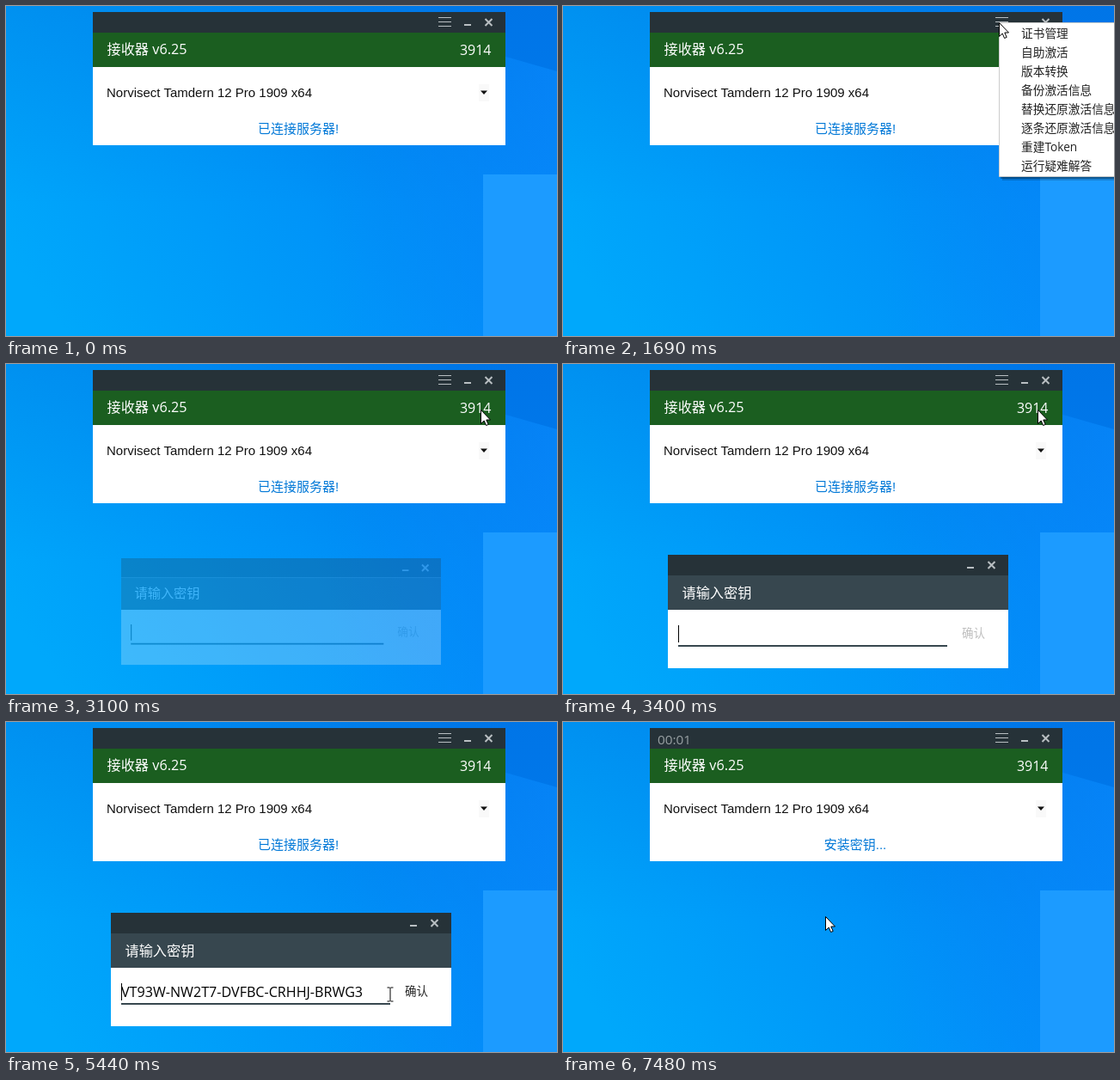
Write an HTML page that moves like this. It is 641 px wide and 384 px high and loops after 8 s.

```html
<!DOCTYPE html>
<html lang="zh-CN">
<head>
<meta charset="utf-8">
<title>接收器</title>
<style>
html, body { margin: 0; width: 100%; height: 100%; overflow: hidden; background: #0090f5; }
svg { display: block; width: 100%; height: 100%; }
text { font: 16.2px "Open Sans", "Noto Sans CJK SC", "Noto Sans CJK", sans-serif; fill: #fff; }
.system { font: 15px "Liberation Sans", "Noto Sans CJK SC", "Noto Sans CJK", sans-serif; fill: #111; }
#status { fill: #0078d7; text-anchor: middle; }
#timer { font-size: 15.3px; fill: #98a0a3; }
#menu text { font-size: 13.7px; fill: #222; }
#key { font-size: 16.1px; fill: #000; }
#confirm { font-size: 13.5px; }
.icon { fill: none; stroke: #b9bfc2; }
</style>
</head>
<body>
<svg viewBox="0 0 641 384">
  <defs>
    <linearGradient id="sky" x1="0" y1=".75" x2="1" y2=".3">
      <stop offset="0" stop-color="#00a8fb"/>
      <stop offset=".5" stop-color="#0094f8"/>
      <stop offset="1" stop-color="#007aee"/>
    </linearGradient>
    <linearGradient id="shade" x1="0" y1="0" x2="0" y2="1">
      <stop offset="0" stop-color="#0062cc" stop-opacity=".2"/>
      <stop offset=".6" stop-color="#0062cc" stop-opacity="0"/>
    </linearGradient>
    <linearGradient id="beam" x1="0" y1="0" x2="1" y2="0">
      <stop offset="0" stop-color="#0a8cff" stop-opacity="0"/>
      <stop offset="1" stop-color="#0a8cff" stop-opacity=".6"/>
    </linearGradient>
  </defs>
  <rect width="641" height="384" fill="url(#sky)"/>
  <rect width="641" height="384" fill="url(#shade)"/>
  <path d="M375 0L641 76V384H375Z" fill="url(#beam)"/>
  <rect x="555" y="196" width="188" height="188" fill="#1c9bff"/>

  <g>
    <rect x="101" y="7" width="480" height="155" fill="#fff"/>
    <path d="M101 7h480v24h-480z" fill="#263238"/>
    <path d="M101 31h480v40h-480z" fill="#1b5e20"/>
    <path class="icon" d="M503 13.500h15m-15 5h15m-15 5h15" stroke="#9ba3a6"/>
    <path class="icon" d="M533 22h8m16.500-7l8 8m0-8l-8 8" stroke-width="2"/>
    <text id="timer" x="110" y="26">00:01</text>
    <text x="117.500" y="56">接收器 v6.25</text>
    <text x="564.500" y="57" text-anchor="end" style="font-size:16px">3914</text>
    <text class="system" x="117" y="106">Norvisect Tamdern 12 Pro 1909 x64</text>
    <path d="M550 91h12v20h-12z" fill="#f9f9f9"/>
    <path d="M552 98.500h8l-4 4.500z" fill="#111"/>
    <text class="system" id="status" x="340" y="148"></text>
  </g>

  <g id="dialog">
    <path d="M122 222h396v132h-396z" fill="#fff"/>
    <path d="M122 222h396v24h-396z" fill="#263238"/>
    <path d="M122 246h396v40h-396z" fill="#37474f"/>
    <path class="icon" d="M470 237h8m16.500-7l8 8m0-8l-8 8" stroke-width="2"/>
    <text x="138.500" y="271.500">请输入密钥</text>
    <text id="key" x="134" y="320">VT93W-NW2T7-DVFBC-CRHHJ-BRWG3</text>
    <path d="M134 327h313v2h-313z" fill="#37474f"/>
    <path id="caret" d="M134 304h1v20h-1z"/>
    <text id="confirm" x="464" y="317.500">确认</text>
  </g>

  <g id="menu">
    <path d="M511 23h130v180h-130z" fill="#000" opacity=".18"/>
    <path d="M509 21h132v180h-132z" fill="#000" opacity=".3"/>
    <path d="M507.500 19.500h140v179h-140z" fill="#fff" stroke="#ccc"/>
    <rect id="hover" x="508" width="133" height="22" fill="#ededed"/>
  </g>

  <g id="cursor">
    <path id="arrow" d="M.5 .5V16.500L4.200 13 6.600 18.500 9.200 17.400 6.800 12H11.500Z" fill="#fff" stroke="#000"/>
    <path id="beamCursor" d="M-3.500-8h3m1 0h3M0-8V8M-3.500 8h3m1 0h3" fill="none" stroke="#000"/>
  </g>
</svg>
<script>
const LOOP = 8000, START = 440, STEP = 78.2;
const $ = id => document.getElementById(id);
const show = (id, on) => $(id).setAttribute('visibility', on ? 'inherit' : 'hidden');
const ramp = (t, from, length) => Math.min(1, Math.max(0, (t - from) / length));

// Pointer path: time, x, y
const path = [
  [440, 434, 258], [1060, 512, 11], [1220, 507, 19], [2235, 507, 19],
  [2470, 538, 44], [2785, 552, 53], [3405, 552, 53], [3724, 366, 318],
  [4110, 337, 311], [4820, 337, 311], [5440, 447, 317], [5680, 464, 316],
  [5840, 469.5, 313.5], [6315, 469.5, 313.5], [6770, 289, 171],
  [7165, 289, 171], [7475, 305, 226]
];

['证书管理', '自助激活', '版本转换', '备份激活信息', '替换还原激活信息',
 '逐条还原激活信息', '重建Token', '运行疑难解答'].forEach((label, i) => {
  const item = document.createElementNS('http://www.w3.org/2000/svg', 'text');
  item.setAttribute('x', 533);
  item.setAttribute('y', 37 + 22 * i);
  item.textContent = label;
  $('menu').append(item);
});

function pointerAt(t) {
  const next = path.findIndex(p => p[0] > t);
  if (next < 0) return path[path.length - 1].slice(1);
  if (next === 0) return path[0].slice(1);
  const [t0, x0, y0] = path[next - 1], [t1, x1, y1] = path[next];
  const s = (t - t0) / (t1 - t0), e = s * s * (3 - 2 * s);
  return [x0 + (x1 - x0) * e, y0 + (y1 - y0) * e];
}

function draw(now) {
  // The screen is refreshed in even steps
  const t = START + STEP * Math.floor((now % LOOP - START) / STEP + 0.1);
  const [x, y] = pointerAt(t);

  const typing = t > 3700 && t < 5600;
  show('cursor', t >= START);
  show('arrow', !typing);
  show('beamCursor', typing);
  $('cursor').setAttribute('transform', `translate(${Math.round(x)} ${Math.round(y)})`);

  const row = Math.floor((y - 21) / 22);
  $('menu').setAttribute('opacity', ramp(t, 1530, 160) - ramp(t, 2860, 160));
  show('hover', row >= 0 && row < 8);
  $('hover').setAttribute('y', 21 + 22 * row);

  const open = ramp(t, 3050, 200) - ramp(t, 5915, 225);
  const scale = 0.92 + 0.08 * open;
  $('dialog').setAttribute('opacity', open);
  $('dialog').setAttribute('transform',
    `translate(320 288) scale(${scale}) translate(-320 -288)`);
  const pasted = t > 4560;
  show('key', pasted);
  $('confirm').style.fill = pasted ? '#222' : '#bdbdbd';
  show('caret', Math.floor((t - 3070) / 590) % 2 === 0);

  const installing = t > 6210;
  show('timer', installing);
  $('status').textContent = installing ? '安装密钥...' : '已连接服务器!';
}

function tick() {
  draw(performance.now());
  requestAnimationFrame(tick);
}
tick();
</script>
</body>
</html>
```
